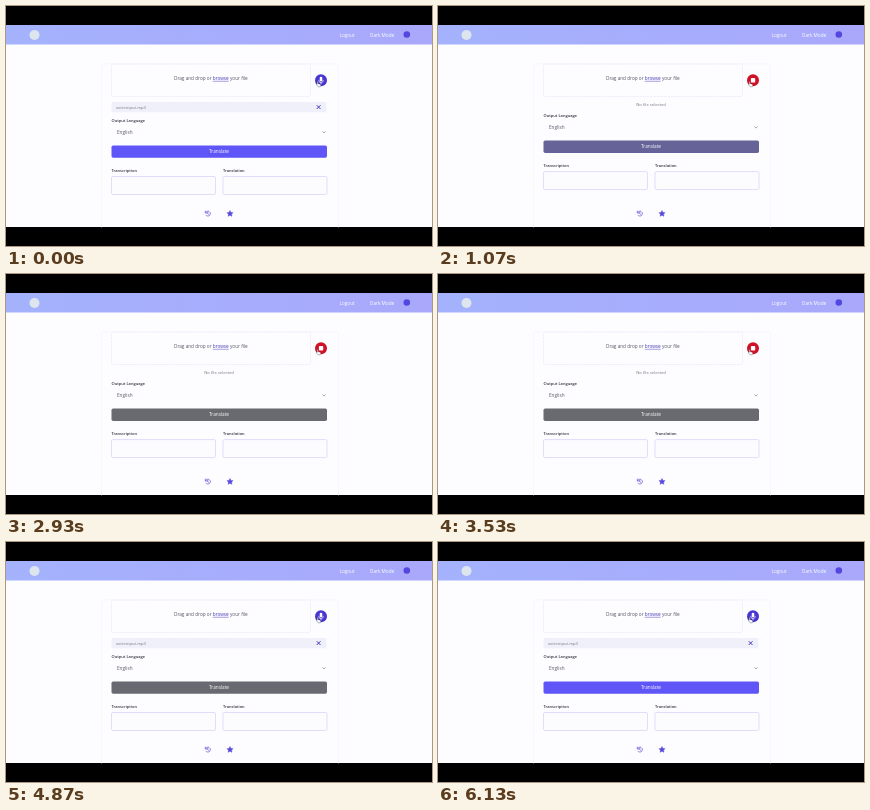
An HTML page for the animation above (6190 ms loop, 426 by 240 pixels).

```html
<!DOCTYPE html>
<html lang="en">
<head>
<meta charset="utf-8">
<title>Voice translator</title>
<style>
  html, body { margin: 0; width: 100%; height: 100%; overflow: hidden; background: #000; }
  svg { display: block; width: 100vw; height: 100vh; }
  text { font: 4.7px "Open Sans", "Noto Sans", sans-serif; fill: #555563; }
  .label { font-size: 4px; font-weight: 600; fill: #34343e; }
  .small { font-size: 4.15px; fill: #77777f; }
  .white { fill: #fff; }
  .mid { text-anchor: middle; }
  .line { fill: none; stroke-linecap: round; stroke-linejoin: round; }
  .box { fill: #fcfcff; stroke: #cdc9f7; stroke-width: .6; }
  .link { fill: #4639b8; text-decoration: underline; }
</style>
</head>
<body>
<svg viewBox="0 0 426 240">
  <defs>
    <linearGradient id="bar">
      <stop stop-color="#a4b2fc"/>
      <stop offset="1" stop-color="#a9a8fb"/>
    </linearGradient>
  </defs>

  <rect y="19" width="426" height="202" fill="#fdfdff"/>
  <rect y="19" width="426" height="19.5" fill="url(#bar)"/>
  <circle cx="28.5" cy="29" r="5" fill="#dce6ec"/>
  <text class="white" x="333.5" y="30.7">Logout</text>
  <text class="white" x="364" y="30.7">Dark Mode</text>
  <circle cx="400.8" cy="28.5" r="3.3" fill="#5546e0"/>

  <path class="line" d="M95.5 221V60q0-2 2-2H330.500q2 0 2 2V221" stroke="#f3f3fa" stroke-width=".7"/>
  <rect class="line" x="105.500" y="58" width="199" height="32.500" rx="1.500" stroke="#e7e7f7" stroke-width=".6" stroke-dasharray="2 1.500"/>
  <text x="168" y="73.900">Drag and drop or <tspan class="link">browse</tspan> your file</text>

  <circle id="disc" cx="315" cy="74.300" r="6"/>
  <g id="mic">
    <rect x="313.700" y="70.700" width="2.600" height="4.700" rx="1.300" fill="#fff"/>
    <path class="line" d="M312.700 74.300a2.300 2.300 0 0 0 4.600 0M315 76.600v1.400" stroke="#fff" stroke-width=".7"/>
  </g>
  <rect id="stop" class="white" x="312.900" y="72.100" width="4.300" height="4.300" rx=".6"/>
  <path d="M311.200 75.600q.7-.5 1 .3v1.800l2 .5q.7.300.5 1.200l-.5 1.400h-2.200l-1.600-2.100q0-.6.8-.4z" fill="#fff" stroke="#333" stroke-width=".35"/>

  <g id="file">
    <rect x="105.500" y="96" width="215" height="10.300" rx="1.500" fill="#f0f0fb"/>
    <text class="small" x="110" y="102.600">voiceinput.mp3</text>
    <path class="line" d="m311 99.500 3.200 3.200m0-3.200-3.200 3.200" stroke="#4336b5" stroke-width="1"/>
  </g>
  <text id="none" class="small mid" x="213" y="100.200">No file selected</text>

  <g id="form">
    <text class="label" x="105.500" y="116">Output Language</text>
    <text x="111" y="128.100">English</text>
    <path class="line" d="m316.800 125.700 1.300 1.200 1.300-1.200" stroke="#666671" stroke-width=".6"/>
    <rect id="button" x="105.500" y="139.500" width="215.500" height="12.300" rx="1.700"/>
    <text class="white mid" x="213" y="147.400">Translate</text>
    <text class="label" x="105.500" y="166">Transcription</text>
    <text class="label" x="217" y="166">Translation</text>
    <rect class="box" x="105.500" y="170.500" width="104" height="18" rx="1.500"/>
    <rect class="box" x="217" y="170.500" width="104" height="18" rx="1.500"/>
  </g>

  <path class="line" d="M199.300 205v2h2M199.500 206.800a2.500 2.500 0 1 1 .5 2.500M201.700 206.300v1.300l1 .6" stroke="#6c60d8" stroke-width=".75"/>
  <path d="m224 204.500.9 1.900 2.100.3-1.500 1.500.4 2.100-1.900-1-1.900 1 .4-2.100-1.500-1.500 2.100-.3z" fill="#5748dc" stroke="#5748dc" stroke-width=".5" stroke-linejoin="round"/>
</svg>
<script>
  const LOOP = 6190, START = 930, END = 4870, FADE = 200;
  const BLUE = [96, 86, 247], GREY = [105, 105, 112];
  const $ = id => document.getElementById(id);
  const show = (id, on) => $(id).setAttribute('visibility', on ? 'visible' : 'hidden');
  const ramp = (t, from) => Math.min(1, Math.max(0, (t - from) / FADE));
  const mix = (a, b, k) => `rgb(${a.map((v, i) => Math.round(v + (b[i] - v) * k))})`;

  function draw(now) {
    const t = now % LOOP;
    const recording = t >= START && t < END;
    show('mic', !recording);
    show('file', !recording);
    show('stop', recording);
    show('none', recording);
    $('disc').setAttribute('fill', recording ? '#d01027' : '#4736d2');
    $('form').setAttribute('transform', `translate(0 ${recording ? -4.9 : 0})`);
    $('button').setAttribute('fill', mix(BLUE, GREY, ramp(t, START) - ramp(t, END)));
    requestAnimationFrame(draw);
  }
  draw(performance.now());
</script>
</body>
</html>
```
